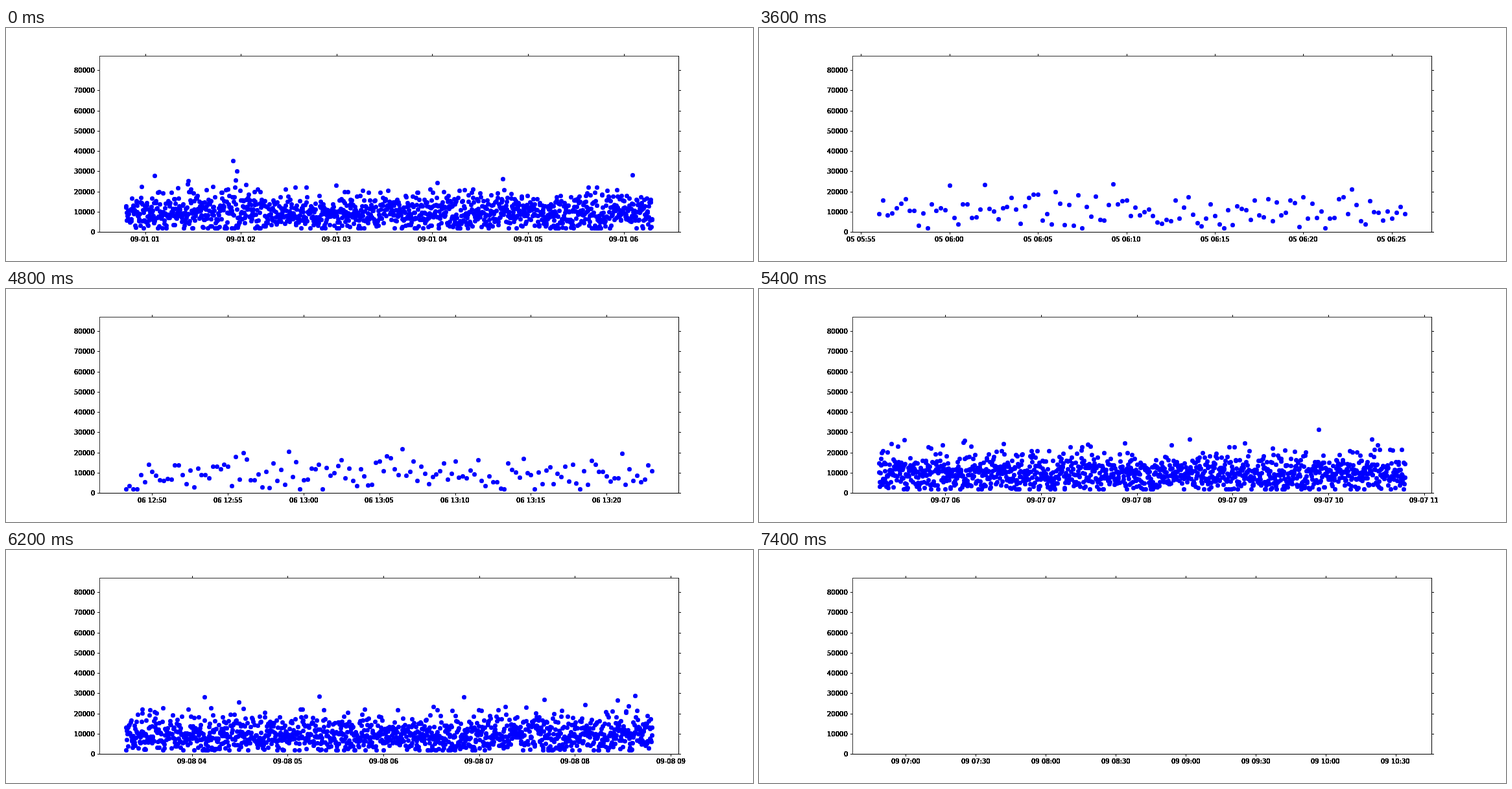
Animation of 1152x360 px, one loop 8 s. Source, as an HTML page with a canvas:

```html
<!DOCTYPE html>
<html lang="en">
<head>
<meta charset="utf-8">
<title>Scatter over time</title>
<style>
  html, body { margin: 0; width: 1152px; height: 360px; overflow: hidden; background: #fff; }
  canvas { display: block; }
</style>
</head>
<body>
<canvas id="stage" width="1152" height="360"></canvas>
<script>
const LOOP = 8000, FRAME = 200;
const BOX = { left: 144, right: 1037, top: 43, bottom: 315 };
const FIRST_X = 184.58, LAST_X = 996.22;   // data span inside the 5% margins
const PX_PER_K = 3.125;
const TICK = 3;

// Times are minutes since the start of day 1.
const at = (day, hour, minute) => ((day - 1) * 24 + hour) * 60 + minute;
const SAMPLE = 0.25;
const WINDOW = 330.018;                    // each frame shows the next 5.5 hours, drifting slightly
const WINDOW_START = at(1, 0, 47.74);

// Spells during which readings were recorded; windows outside them are empty.
const sessions = [
  [at(1, 0, 0), at(1, 6, 19.75)],
  [at(5, 5, 56), at(5, 6, 25.75)],
  [at(5, 11, 4), at(5, 23, 38)],
  [at(6, 1, 48.25), at(6, 13, 23)],
  [at(7, 1, 25.75), at(9, 10, 34)]
];

const ctx = document.getElementById('stage').getContext('2d');

function seeded(seed) {
  return () => {
    seed = (seed + 0x6D2B79F5) | 0;
    let n = Math.imul(seed ^ (seed >>> 15), 1 | seed);
    n = (n + Math.imul(n ^ (n >>> 7), 61 | n)) ^ n;
    return ((n ^ (n >>> 14)) >>> 0) / 4294967296;
  };
}

// Slightly skewed bell curve, in thousands, with a hard floor.
function readings(count, seed) {
  const random = seeded(seed);
  return Array.from({ length: count }, () => {
    const z = Math.sqrt(-2 * Math.log(1 - random())) * Math.cos(2 * Math.PI * random());
    return Math.max(1.9, 9.5 + 4.9 * z + 0.35 * z * z);
  });
}

function recordedSpan(index) {
  const from = WINDOW_START + index * WINDOW;
  const to = from + WINDOW;
  const session = sessions.find(([first, last]) => first < to && last >= from);
  if (!session) return null;
  const start = Math.max(session[0], Math.ceil(from / SAMPLE) * SAMPLE);
  const end = Math.min(session[1], Math.floor(to / SAMPLE) * SAMPLE);
  return { start, span: end - start };
}

// An empty window keeps the axes of the one before it.
const frames = [];
for (let i = 0; i < LOOP / FRAME; i++) {
  const recorded = recordedSpan(i);
  frames.push(recorded
    ? { ...recorded, values: readings(recorded.span / SAMPLE + 1, i + 17) }
    : { ...frames[i - 1], values: [] });
}

function tickStep(view) {
  if (view < 5) return 0.25;
  if (view <= 50) return 5;
  if (view <= 100) return 10;
  if (view <= 150) return 15;
  return view < 300 ? 30 : 60;
}

function timeLabel(minutes, step) {
  const two = n => String(Math.floor(n)).padStart(2, '0');
  const day = two(minutes / 1440 + 1);
  const hour = two(minutes / 60 % 24);
  const minute = two(minutes % 60);
  if (step < 1) return `${hour}:${minute}:${two(minutes % 1 * 60)}`;
  return step < 60 ? `${day} ${hour}:${minute}` : `09-${day} ${hour}`;
}

// Overprinting gives the labels their heavy edges; anchor is 0.5 for centred, 1 for right-aligned.
function label(text, x, y, anchor) {
  const left = Math.round(x - ctx.measureText(text).width * anchor);
  for (let i = 0; i < 12; i++) ctx.fillText(text, left, y);
}

function drawBorder() {
  const { left, right, top, bottom } = BOX;
  const width = right - left + 1, height = bottom - top + 1;
  ctx.fillStyle = '#333';
  ctx.fillRect(left, top, width, 1);
  ctx.fillRect(left, top, 1, height);
  ctx.fillStyle = '#000';
  ctx.fillRect(left, bottom, width, 1);
  ctx.fillRect(right, top, 1, height);
}

function drawValueAxis() {
  for (let k = 0; k <= 80; k += 10) {
    const y = Math.round(BOX.bottom - k * PX_PER_K);
    ctx.fillRect(BOX.left - TICK, y, TICK, 1);
    ctx.fillRect(BOX.right + 1, y, TICK, 1);
    label(String(k * 1000), 137, y + 4, 1);
  }
}

function drawTimeAxis({ start, span }) {
  const margin = span / 20;
  const step = tickStep(span * 1.1);
  const first = Math.ceil((start - margin) / step) * step;
  for (let m = first; m <= start + span + margin; m += step) {
    const x = FIRST_X + (m - start) / span * (LAST_X - FIRST_X);
    ctx.fillRect(Math.round(x), BOX.top - TICK, 1, TICK);
    ctx.fillRect(Math.round(x), BOX.bottom + 1, 1, TICK);
    label(timeLabel(m, step), x, 330, 0.5);
  }
}

function drawDots({ values }) {
  const gap = (LAST_X - FIRST_X) / (values.length - 1);
  ctx.fillStyle = '#00f';
  values.forEach((value, i) => {
    const x = Math.round(FIRST_X + i * gap) + 0.5;
    const y = Math.round(BOX.bottom - value * PX_PER_K) + 0.5;
    ctx.beginPath();
    ctx.arc(x, y, 3.5, 0, 2 * Math.PI);
    ctx.fill();
  });
}

let shown;
function render(time) {
  const frame = frames[Math.floor(time % LOOP / FRAME)];
  if (frame === shown) return;
  shown = frame;
  ctx.fillStyle = '#fff';
  ctx.fillRect(0, 0, 1152, 360);
  ctx.font = '10px "DejaVu Sans", sans-serif';
  drawDots(frame);
  drawBorder();
  drawValueAxis();
  drawTimeAxis(frame);
}

const begin = performance.now();
function tick() {
  render(performance.now() - begin);
  requestAnimationFrame(tick);
}
tick();
</script>
</body>
</html>
```
